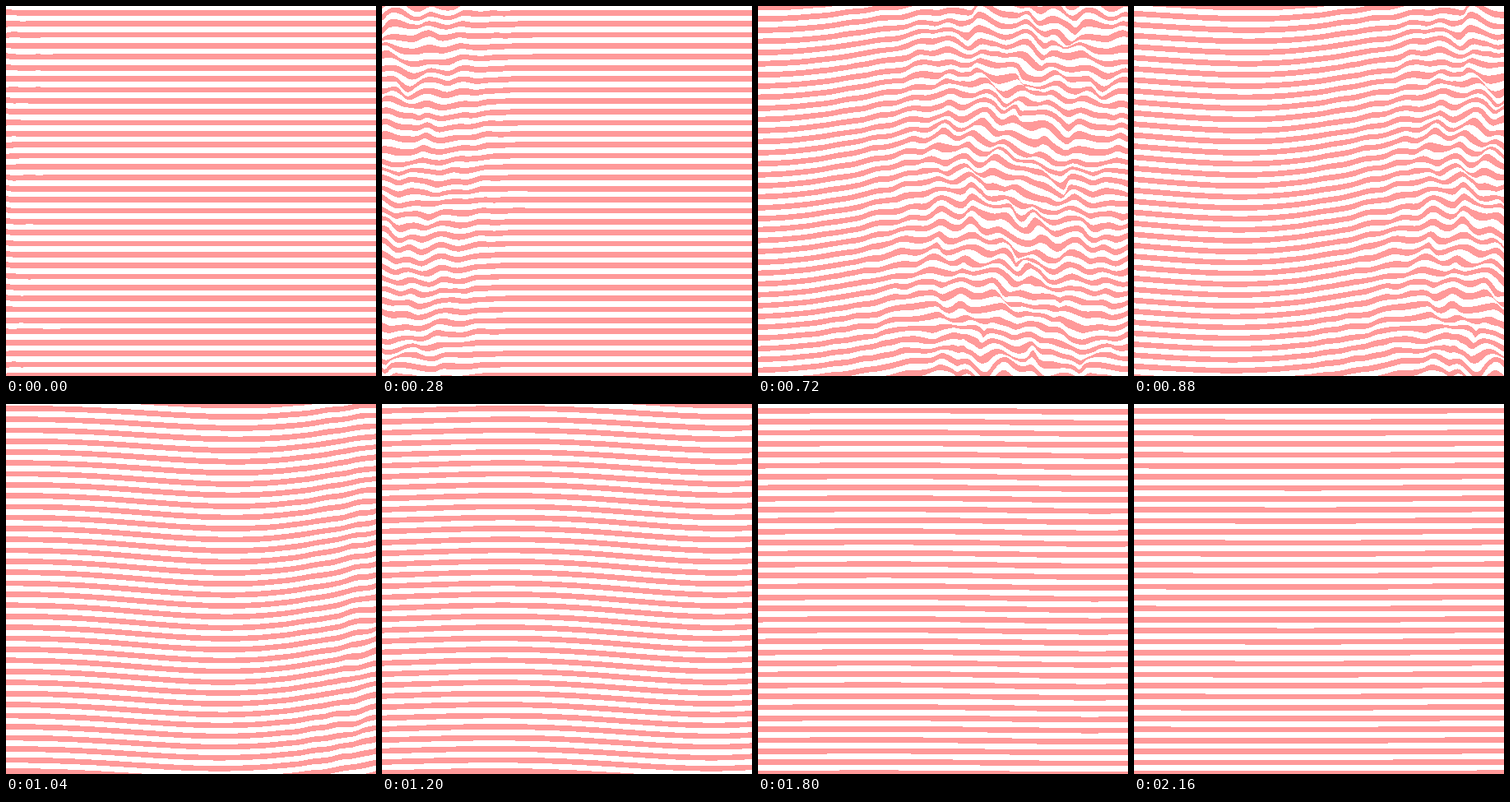
An HTML page for the animation above (2.2 s loop, 450 px wide and 450 px high).

```html
<!DOCTYPE html>
<html lang="en">
<head>
<meta charset="utf-8">
<title>Rippling stripes</title>
<style>
  html, body { margin: 0; width: 100%; height: 100%; overflow: hidden; background: #fff; }
  svg { display: block; width: 100%; height: 100%; }
</style>
</head>
<body>
<svg id="stage" viewBox="0 0 450 450" shape-rendering="crispEdges"></svg>
<script>
const LOOP = 2200, STEP = 40;
const SPEED = 0.88;            // wave travel, px per ms
const PITCH = 13.36, TOP = 5, THICK = 6.7;
const FIRST = -4, LAST = 37, DX = 3, MARGIN = 24;

const stage = document.getElementById('stage');
const stripes = [];
for (let i = FIRST; i <= LAST; i++) {
  const path = document.createElementNS('http://www.w3.org/2000/svg', 'path');
  // Translucent red, so folds that overlap turn darker.
  path.setAttribute('fill', 'rgba(255,0,0,0.4)');
  stage.appendChild(path);
  stripes.push({ path, y: TOP + i * PITCH });
}

const smooth = v => {
  v = Math.min(1, Math.max(0, v));
  return v * v * (3 - 2 * v);
};

function hash(i, j) {
  const v = Math.sin(i * 127.1 + j * 311.7) * 43758.5453;
  return (v - Math.floor(v)) * 2 - 1;
}

function noise(x, y) {
  const i = Math.floor(x), j = Math.floor(y);
  const u = smooth(x - i), v = smooth(y - j);
  const a = hash(i, j) + (hash(i + 1, j) - hash(i, j)) * u;
  const b = hash(i, j + 1) + (hash(i + 1, j + 1) - hash(i, j + 1)) * u;
  return a + (b - a) * v;
}

// Damped swell that follows the front, strongest at mid height;
// s is the time since the wave reached x.
function swell(s, y) {
  const age = s - 455;
  const height = 17 + 7 * Math.sin(y * Math.PI / 450);
  return -height * smooth((s - 80) / 340) * Math.exp(-Math.max(0, age) / 330)
    * Math.cos(age * Math.PI / 300);
}

function roughness(s) {
  const d = (s - 365) / (s < 365 ? 185 : 145);
  return Math.exp(-d * d) * smooth((s - 60) / 120);
}

function displace(x, y, t) {
  const s = t - x / SPEED - 25 * (y / 450 - 0.3);
  const rough = roughness(s);
  let dx = 0, dy = swell(s, y);
  if (rough > 0.004) {
    const w = s * SPEED;
    const phase = w * Math.PI * 2 / 42 + 1.8 * noise(w / 80, y / 70);
    dy += rough * (4 * Math.sin(phase) + 8 * noise(w / 24, y / 30 + 9)
      + 3.5 * noise(w / 12, y / 18 + 40));
    dx = rough * 10 * noise(w / 30 + 50, y / 24);
  }
  if (t < 120) dy += 1.6 * Math.exp(-Math.max(0, x) / 14 - t / 60) * noise(x / 10, y / 30);
  return (x + dx).toFixed(1) + ' ' + (y + dy).toFixed(1);
}

function render(t) {
  for (const { path, y } of stripes) {
    const upper = [], lower = [];
    for (let x = -MARGIN; x <= 450 + MARGIN; x += DX) {
      upper.push(displace(x, y, t));
      lower.push(displace(x, y + THICK, t));
    }
    path.setAttribute('d', 'M' + upper.concat(lower.reverse()).join('L') + 'Z');
  }
}

const start = performance.now();
let shown = -1;
function tick() {
  const now = Math.max(0, performance.now() - start) % LOOP;
  const t = Math.floor(now / STEP) * STEP;
  if (t !== shown) render(shown = t);
  requestAnimationFrame(tick);
}
tick();
</script>
</body>
</html>
```
